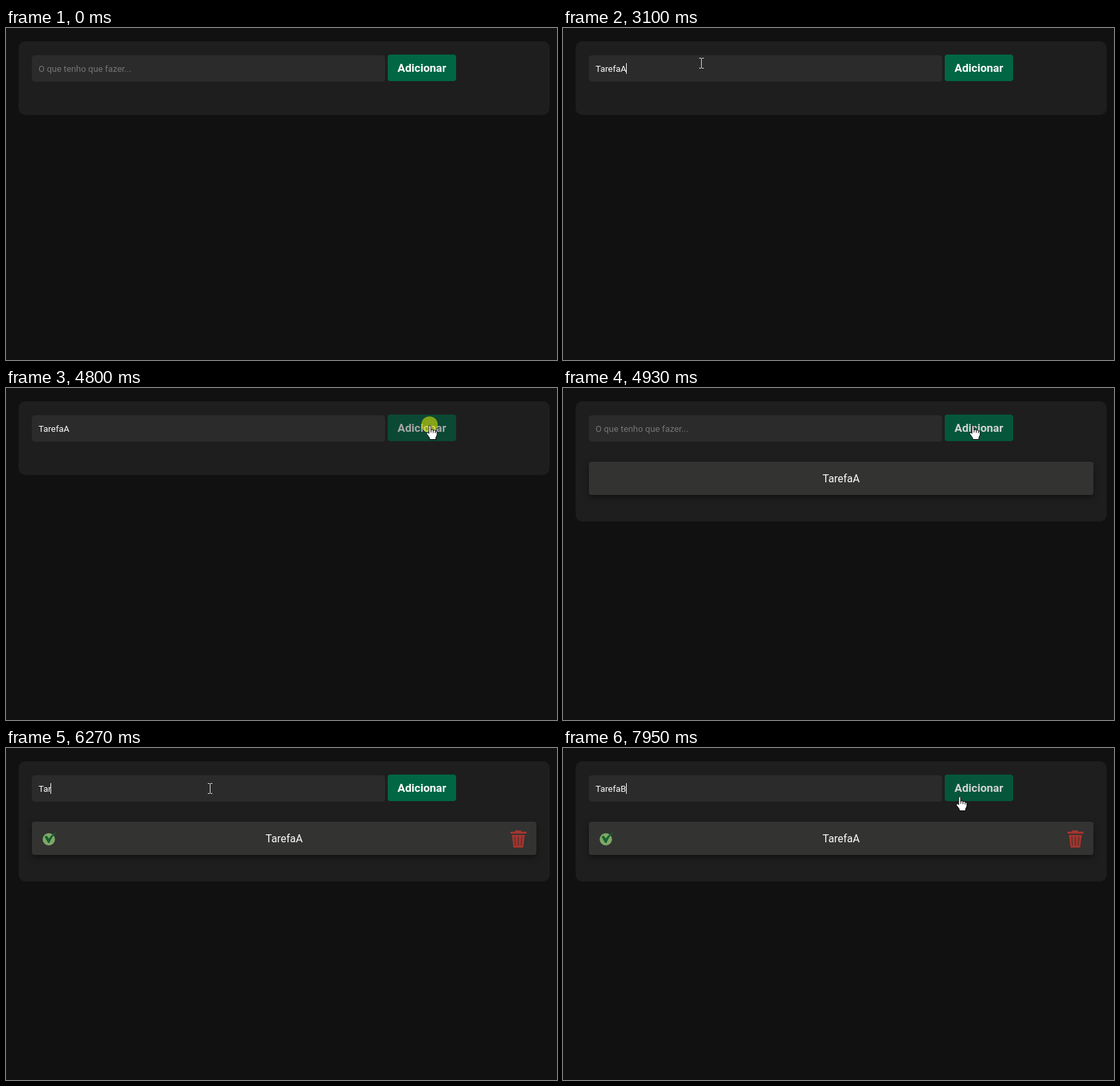
An HTML page that plays this animation: 830x500 px, repeating every 8 s.

```html
<!DOCTYPE html>
<html lang="pt-BR">
<head>
<meta charset="utf-8">
<title>Lista de tarefas</title>
<style>
  html, body { margin: 0; width: 100%; height: 100%; overflow: hidden; background: #111; }
  svg { display: block; font-family: Roboto, sans-serif; }
  #field { font-size: 13.333px; }
  #task { filter: drop-shadow(0 4px 5px rgba(0, 0, 0, .4)); }
  .pointer { stroke: #000; fill: #fff; stroke-linejoin: round; }
</style>
</head>
<body>
<svg width="830" height="500" viewBox="0 0 830 500">
  <rect id="panel" x="19" y="20" width="800" height="111" rx="10" fill="#1e1e1e"/>
  <rect x="39" y="41" width="532" height="40" rx="5" fill="#2b2b2b"/>
  <text id="field" x="49" y="66"></text>
  <rect id="caret" y="53" width="1" height="16" fill="#fff"/>

  <g id="button">
    <rect x="575" y="40" width="103" height="40" rx="4" fill="#064"/>
    <text x="626.5" y="66" font-size="17" font-weight="700" text-anchor="middle" fill="#fff">Adicionar</text>
  </g>

  <g id="task">
    <rect x="39" y="111" width="760" height="50" rx="4" fill="#333331"/>
    <text x="419" y="142" font-size="16" text-anchor="middle" fill="#fff">TarefaA</text>
    <g id="icons">
      <circle cx="64.5" cy="137.5" r="9.3" fill="#7fa869"/>
      <path d="M58 133.5l3.5-1.5 3 4.5Q69 129 77 126.5Q69 133 65.5 143H63.5Z" fill="#17602f"/>
      <g fill="#a3352e">
        <path d="M767 126v-2h9v2h8v3h-24v-3z"/>
        <path d="M762 131h19.500l-2.500 19h-14.500z"/>
      </g>
      <path d="M766.500 133.500l1 13.500M771.700 133.500v13.500M777 133.500l-1 13.500" stroke="#4a302d" stroke-width="1.300"/>
    </g>
  </g>

  <g id="cursor">
    <circle id="press" r="12.300" fill="#ff0" fill-opacity=".5"/>
    <path id="arrow" class="pointer" d="M.5.5V17L4.300 13.400 6.800 19 9.300 18 6.800 12.300H12Z"/>
    <path id="beam" fill="none" stroke="#ddd" d="M-3-7.500H0M1-7.500H4M.5-7V7M-3 7.500H0M1 7.500H4"/>
    <g id="hand" class="pointer" transform="translate(.5 .5)">
      <path d="M-1.500 13V2Q0-.5 1.500 2V7.500Q3.500 6.500 5 8.200 7 7.300 8.200 9 10.500 8.500 10.800 11V15.500L9 19V22H-.5V19.500L-5 13.500Q-5 10.500-2.500 11.500Z"/>
      <path d="M1.700 7v4.500M5 8.500V12M8.200 9.500v3"/>
    </g>
  </g>
</svg>
<script>
const $ = id => document.getElementById(id);
const show = (id, on) => $(id).setAttribute('visibility', on ? 'inherit' : 'hidden');
const set = (id, name, value) => $(id).setAttribute(name, value);

const LOOP = 8000, STEP = 67, ADDED = 4930;
const keysA = [1280, 1480, 1680, 2160, 2430, 2560, 3100];
const keysB = [5800, 6000, 6270, 6340, 6470, 6610, 7470];
const focusTimes = [680, 5400];
const presses = [[670, 810], [4800, ADDED], [5400, 5530]];

// start, steps, target x, target y, vertical bend
const moves = [
  [70, 1, 549, 301, 0],
  [140, 7, 208, 53, -494],
  [4240, 8, 638, 55, 0],
  [ADDED, 1, 617, 55, 0],
  [5000, 1, 386, 70, 0],
  [5070, 5, 307, 61, 0],
  [7610, 6, 597, 72, 0]
];

function pointerAt(t) {
  let x = 549, y = 301;
  for (const [start, steps, toX, toY, bend] of moves) {
    if (t < start) break;
    const p = Math.min(1, (Math.floor((t - start) / STEP) + 1) / steps);
    const e = p * p * (3 - 2 * p);
    x += (toX - x) * e;
    y += (toY - y) * e + bend * e * (1 - e);
  }
  return [Math.round(x), Math.round(y)];
}

function drawField(t) {
  const [word, keys] = t < ADDED ? ['TarefaA', keysA] : ['TarefaB', keysB];
  const value = word.slice(0, keys.filter(k => k <= t).length);
  const field = $('field');
  field.textContent = value || 'O que tenho que fazer...';
  field.setAttribute('fill', value ? '#fff' : '#757575');

  const focused = t >= focusTimes[0] && t < 4800 || t >= focusTimes[1];
  const last = Math.max(...[...keys, ...focusTimes].filter(k => k <= t));
  show('caret', focused && (t - last) % 990 < 530);
  set('caret', 'x', Math.floor(49 + (value ? field.getComputedTextLength() : 0)));
}

function drawPointer(t) {
  const [x, y] = pointerAt(t);
  const inside = (left, top, right, bottom) => x >= left && x < right && y >= top && y < bottom;
  const overField = inside(39, 41, 571, 81), overButton = t >= 70 && inside(575, 40, 678, 80);
  const pressed = presses.some(([from, to]) => t >= from && t < to);
  set('cursor', 'transform', `translate(${x} ${y})`);
  show('cursor', t >= 70);
  show('press', pressed);
  show('beam', overField);
  show('hand', overButton);
  show('arrow', !overField && !overButton);
  set('button', 'opacity', overButton ? (pressed ? .6 : .8) : 1);
}

function frame(now) {
  const t = now % LOOP;
  set('panel', 'height', t < ADDED ? 111 : 181);
  show('task', t >= ADDED);
  show('icons', t >= 5000);
  // "inherit" keeps hidden groups from showing their children
  drawField(t);
  drawPointer(t);
  requestAnimationFrame(() => frame(performance.now() - begin));
}

const begin = performance.now();
frame(0);
</script>
</body>
</html>
```
